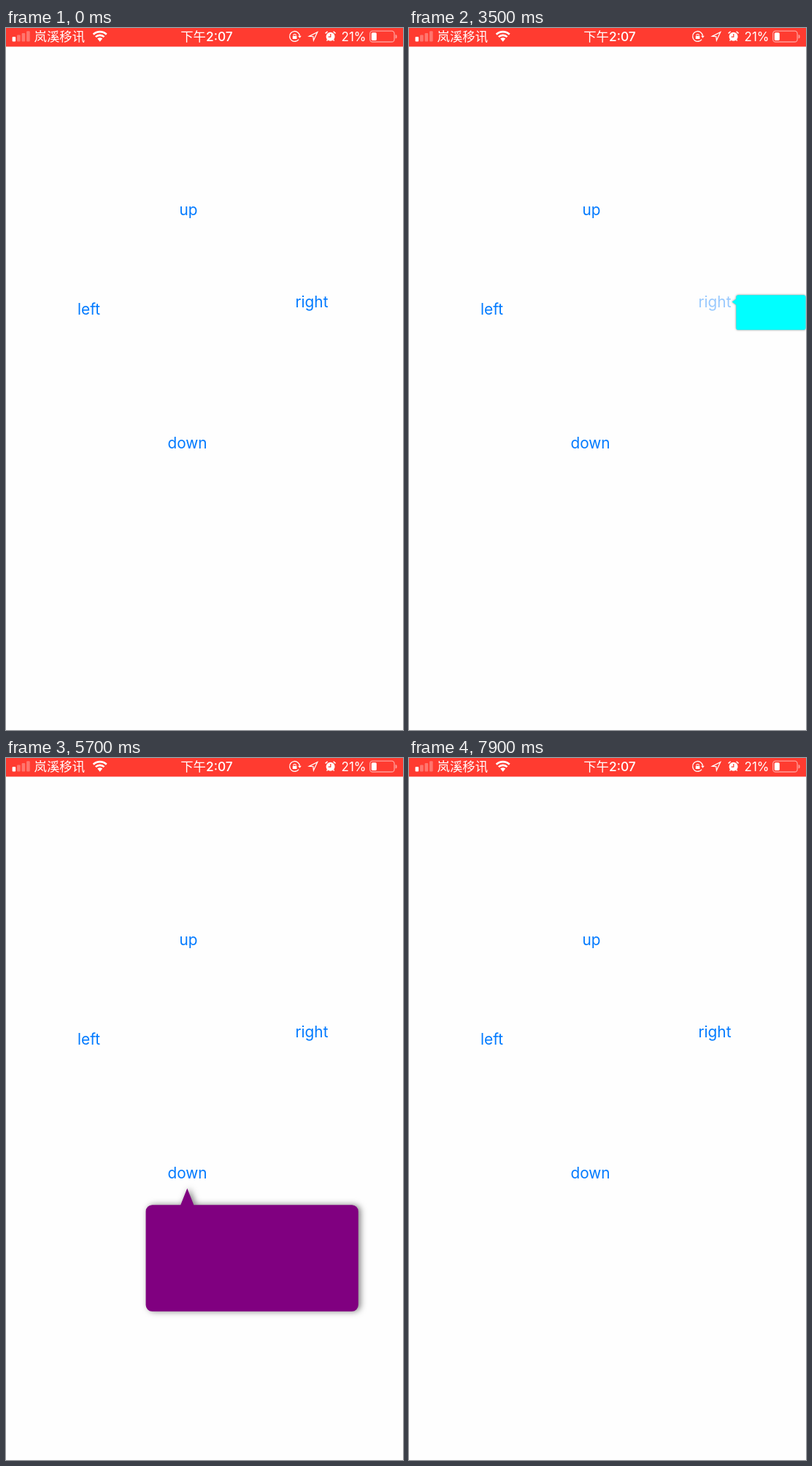
An HTML page with a canvas for the animation above (8000 ms loop, 544 by 960 pixels).

```html
<!DOCTYPE html>
<html lang="zh-CN">
<head>
<meta charset="utf-8">
<title>Popover directions</title>
<style>
html, body { margin: 0; width: 100%; height: 100%; overflow: hidden; background: #fefefe; }
canvas { display: block; width: 544px; height: 960px; }
</style>
</head>
<body>
<canvas id="stage" width="544" height="960"></canvas>
<script>
const ctx = document.getElementById('stage').getContext('2d');
const LOOP = 8000, STEP = 100;
const BOX_W = 290, BOX_H = 145, RADIUS = 8.7;
const FONT = 'Inter, "Noto Sans CJK SC", "Noto Sans CJK", sans-serif';

// tip: anchor of the bubble; box: its corner relative to the tip; half: half arrow base
const items = [
  { text: 'up', x: 250, y: 255.5, tip: [249.7, 225], box: [-56.5, -23 - BOX_H], half: 9,
    color: '#996633', press: 1300, open: 1400, close: 2655, shade: 3, freeze: [1500, 1800] },
  { text: 'right', x: 419, y: 381.5, tip: [442.6, 374.6], box: [17.4, -28.7], half: 11.8,
    color: '#00ffff', press: 3400, open: 3400, close: 4455, shade: 0 },
  { text: 'down', x: 248.5, y: 574.5, tip: [248.3, 588.6], box: [-56.5, 22.5], half: 9,
    color: '#800080', press: 5042, open: 5042, close: 5955, shade: 3 },
  { text: 'left', x: 113.5, y: 391.5, tip: [91.5, 384], box: [-17.4 - BOX_W, -28.7], half: 11.8,
    color: '#ff8000', press: 6400, open: 6420, close: 7600, shade: 1 }
];

// Underdamped spring, peaking 7% over at 0.4 s
function spring(s) {
  const w = Math.PI / 0.4, d = 6.65;
  return 1 - Math.exp(-d * s) * (Math.cos(w * s) + d / w * Math.sin(w * s));
}

function easeInOut(u) {
  return u < 0.5 ? 2 * u * u : 1 - 2 * (1 - u) * (1 - u);
}

function localTime(item, t) {
  const f = item.freeze;
  return f && t >= f[0] && t < f[1] ? f[0] : t;
}

function scaleAt(item, t) {
  if (t <= item.open) return 0;
  if (t > item.close) {
    const u = (t - item.close) / 300;
    return u > 0.95 ? 0 : 1 - easeInOut(u);
  }
  const s = (t - item.open) / 1000;
  return s > 0.75 ? 1 : spring(s);
}

function labelAlpha(item, t) {
  if (t < item.press) return 1;
  return Math.min(1, 0.2 + 0.8 * Math.max(0, t - item.open) / 400);
}

function text(str, x, y, font, align, color) {
  ctx.font = font + ' ' + FONT;
  ctx.textAlign = align;
  ctx.fillStyle = color;
  ctx.fillText(str, x, y);
}

function path(points, close) {
  ctx.beginPath();
  points.forEach(p => ctx.lineTo(p[0], p[1]));
  if (close) ctx.closePath();
}

function rounded(x, y, w, h, r) {
  ctx.beginPath();
  ctx.roundRect(x, y, w, h, r);
}

function bubble(item, scale) {
  if (scale <= 0) return;
  const [bx, by] = item.box, h = item.half;
  ctx.save();
  ctx.translate(item.tip[0], item.tip[1]);
  ctx.scale(scale, scale);
  ctx.shadowColor = 'rgba(0,0,0,0.5)';
  ctx.shadowBlur = 8.7 * scale;
  ctx.shadowOffsetX = item.shade * scale;
  ctx.fillStyle = item.color;
  rounded(bx, by, BOX_W, BOX_H, RADIUS);
  ctx.moveTo(0, 0);
  if (item.text === 'up') {
    ctx.lineTo(h, by + BOX_H);
    ctx.lineTo(-h, by + BOX_H);
  } else if (item.text === 'down') {
    ctx.lineTo(h, by);
    ctx.lineTo(-h, by);
  } else {
    const edge = bx > 0 ? bx : bx + BOX_W;
    const side = bx > 0 ? 1 : -1;
    ctx.lineTo(edge, -h * side);
    ctx.lineTo(edge, h * side);
  }
  ctx.closePath();
  ctx.fill();
  ctx.restore();
}

function signal() {
  for (let i = 0; i < 4; i++) {
    ctx.fillStyle = i ? 'rgba(255,255,255,0.3)' : '#fff';
    const h = 6.5 + i * 2.6;
    rounded(8.6 + i * 6.5, 18.6 - h, 4.6, h, 1);
    ctx.fill();
  }
}

function wifi() {
  const cx = 128.7, cy = 18.2, a = Math.PI / 4.1;
  ctx.strokeStyle = ctx.fillStyle = '#fff';
  ctx.lineWidth = 2.7;
  for (const r of [13, 8.4]) {
    ctx.beginPath();
    ctx.arc(cx, cy, r, -Math.PI / 2 - a, -Math.PI / 2 + a);
    ctx.stroke();
  }
  ctx.beginPath();
  ctx.moveTo(cx, cy + 0.6);
  ctx.arc(cx, cy, 5, -Math.PI / 2 - a, -Math.PI / 2 + a);
  ctx.fill();
}

function rotationLock() {
  ctx.strokeStyle = ctx.fillStyle = '#fff';
  ctx.lineWidth = 1.3;
  ctx.beginPath();
  ctx.arc(395.6, 11.4, 6.9, 0.65, Math.PI * 2 - 0.1);
  ctx.stroke();
  path([[400.2, 10.8], [404.8, 10.8], [402.5, 13.8]], true);
  ctx.fill();
  ctx.fillRect(392.8, 10.8, 5.6, 4.2);
  ctx.lineWidth = 1.2;
  ctx.beginPath();
  ctx.arc(395.6, 10.3, 1.8, Math.PI, 0);
  ctx.stroke();
}

function locationArrow() {
  ctx.strokeStyle = '#fff';
  ctx.lineWidth = 1.2;
  path([[426.8, 5.6], [415.4, 11.2], [420.9, 11.6], [421.4, 17]], true);
  ctx.stroke();
}

function alarm() {
  ctx.strokeStyle = ctx.fillStyle = '#fff';
  ctx.beginPath();
  ctx.arc(444.6, 11.8, 6, 0, Math.PI * 2);
  ctx.fill();
  ctx.lineWidth = 1.5;
  for (const s of [-1, 1]) {
    path([[444.6 + s * 7, 7.4], [444.6 + s * 4, 4.7]]);
    ctx.stroke();
    path([[444.6 + s * 4, 16], [444.6 + s * 5, 17.6]]);
    ctx.stroke();
  }
  ctx.strokeStyle = '#ff3b30';
  ctx.lineWidth = 1.2;
  path([[444.8, 8], [444.8, 12.2], [441.6, 12.2]]);
  ctx.stroke();
}

function battery() {
  ctx.strokeStyle = 'rgba(255,255,255,0.5)';
  ctx.lineWidth = 1.3;
  rounded(498.7, 4.2, 33.4, 14.8, 3.6);
  ctx.stroke();
  ctx.fillStyle = 'rgba(255,255,255,0.5)';
  rounded(533.6, 9, 2, 5.4, [0, 2, 2, 0]);
  ctx.fill();
  ctx.fillStyle = '#fff';
  rounded(500.8, 6.2, 7, 10.8, 1.6);
  ctx.fill();
}

function statusBar() {
  ctx.fillStyle = '#ff3b30';
  ctx.fillRect(0, 0, 544, 25.5);
  signal();
  text('岚溪移讯', 38.5, 18, '17.4px', 'left', '#fff');
  wifi();
  text('下午2:07', 275, 18, '500 17.4px', 'center', '#fff');
  rotationLock();
  locationArrow();
  alarm();
  text('21%', 493.5, 18, '17px', 'right', '#fff');
  battery();
}

function draw(now) {
  const t = Math.floor((now % LOOP) / STEP) * STEP;
  ctx.fillStyle = '#fefefe';
  ctx.fillRect(0, 0, 544, 960);
  statusBar();
  for (const item of items) {
    ctx.globalAlpha = labelAlpha(item, localTime(item, t));
    text(item.text, item.x, item.y, '20.8px', 'center', '#007aff');
  }
  ctx.globalAlpha = 1;
  for (const item of items) bubble(item, scaleAt(item, localTime(item, t)));
}

const start = performance.now();
function tick() {
  draw(performance.now() - start);
  requestAnimationFrame(tick);
}
tick();
</script>
</body>
</html>
```
